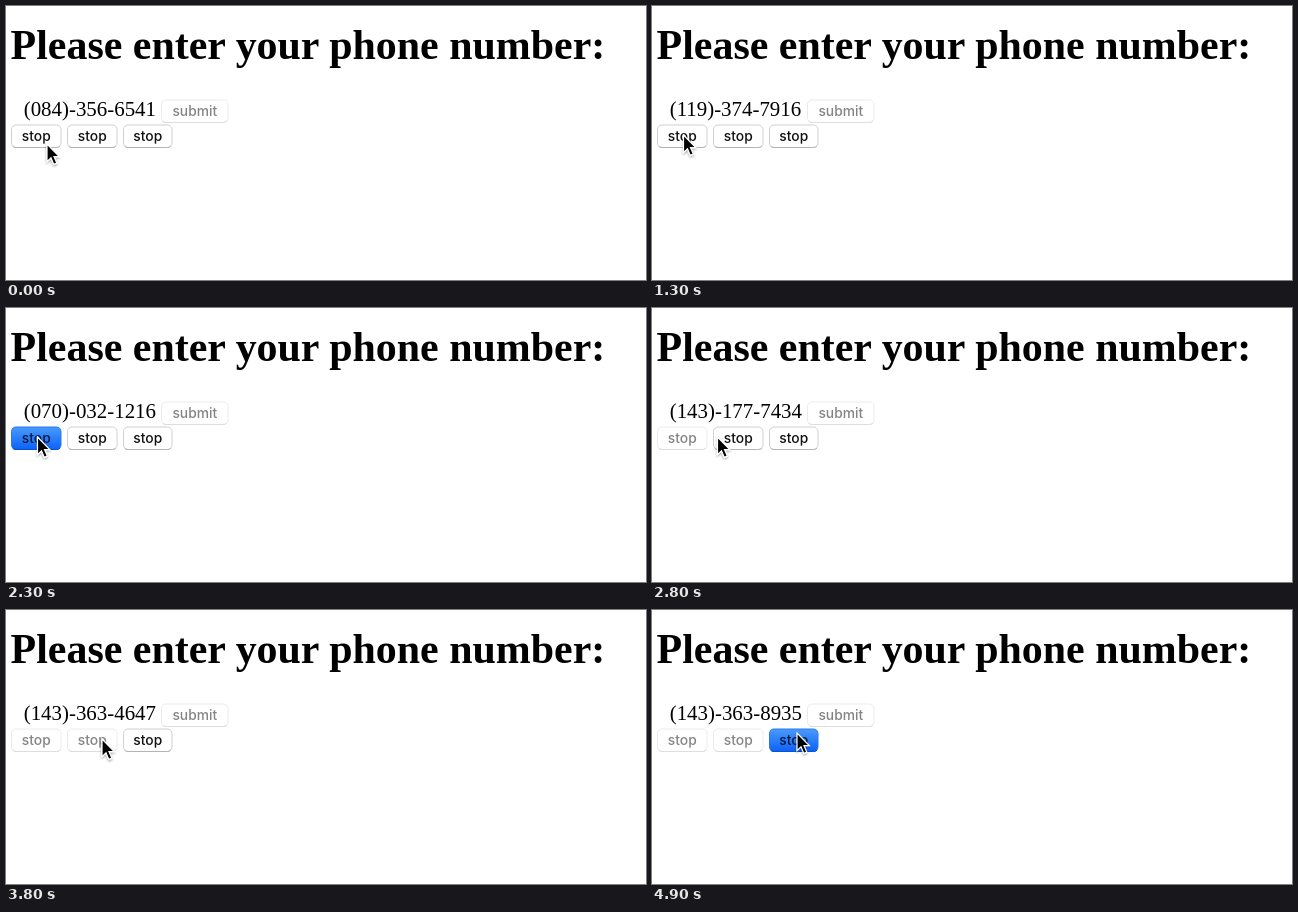
An HTML page that plays this animation: 640 px wide and 274 px high, repeating every 5 s.

```html
<!DOCTYPE html>
<html lang="en">
<head>
<meta charset="utf-8">
<title>Phone number</title>
<style>
  html, body { margin: 0; height: 100%; overflow: hidden; background: #fff; }
  svg { display: block; width: 100%; height: 100%; }
  .serif { font-family: "Liberation Serif", Times, serif; }
  .button text { font: 500 13.8px Inter, Arial, sans-serif; text-anchor: middle; fill: #111; }
  .button rect { fill: #fff; stroke: #d0d0d0; }
  .button .edge { fill: none; stroke: #b4b4b4; }
  .off text { fill: #848484; }
  .off rect { stroke: #ebebeb; }
  .off .edge { stroke: #dedede; }
  .down rect { fill: url(#blue); stroke: #2a78ee; }
  .down .edge { stroke: #0a50d0; }
  .down text { fill: #06193f; }
</style>
</head>
<body>
<svg id="stage" viewBox="0 0 640 274">
  <defs>
    <linearGradient id="blue" x2="0" y2="1">
      <stop stop-color="#4a9afc"/>
      <stop offset="1" stop-color="#0c62f8"/>
    </linearGradient>
    <filter id="shadow" x="-50%" y="-50%" width="200%" height="200%">
      <feDropShadow dx="0" dy="1.2" stdDeviation="1.1" flood-opacity=".4"/>
    </filter>
  </defs>
  <text class="serif" x="4.6" y="53" font-size="41.93" font-weight="bold">Please enter your phone number:</text>
  <text class="serif" id="phone" x="17.7" y="110" font-size="20.9"></text>
  <g id="buttons"></g>
  <path id="cursor" filter="url(#shadow)" stroke="#fff" stroke-width="1.2"
    d="M0 0V17.6L4 13.8L6.8 20.4L9.8 19.1L7 12.7H12.3Z"/>
</svg>
<script>
const LOOP = 5000, STEP = 100;
const $ = id => document.getElementById(id);

// Steps at which each stop button is pressed and released
const presses = [[22, 24], [36, 38], [49, 51]];

// Pointer keys: step, x, y
const path = [
  [0, 41, 138], [6, 31.5, 129], [25, 31.5, 129], [28, 65.5, 129], [33, 96, 129],
  [39, 96, 129], [42, 117, 129], [48, 145, 123], [50, 145, 123]
];

function addButton(label, x, y, w) {
  const h = 22.5;
  $('buttons').insertAdjacentHTML('beforeend', `<g class="button">
    <rect x="${x}" y="${y}" width="${w}" height="${h}" rx="4.5"/>
    <path class="edge" d="M${x + 1} ${y + h - 1.5}q1 1.5 3.5 1.5h${w - 9}q2.5 0 3.5 -1.5"/>
    <text x="${x + w / 2}" y="${y + 16.3}">${label}</text></g>`);
  return $('buttons').lastElementChild;
}

addButton('submit', 155.5, 94, 66.5).classList.add('off');
const stops = [5.5, 61.5, 117.5].map((x, i) => addButton('stop', x, 119, i < 2 ? 49.5 : 48.5));

function random(step, group) {
  const v = Math.sin(step * 12.9898 + group * 78.233 + 4) * 43758.5453;
  return v - Math.floor(v);
}

// Each group rolls until its button is released
function digits(step, group, limit, size) {
  const n = Math.floor(random(Math.min(step, presses[group][1]), group) * limit);
  return String(n).padStart(size, '0');
}

function pointer(step) {
  const i = path.findIndex(k => k[0] > step);
  const [a, x, y] = path[i - 1], [b, u, v] = path[i];
  const p = (step - a) / (b - a);
  return [x + (u - x) * p, y + (v - y) * p];
}

function draw() {
  const step = Math.floor(performance.now() % LOOP / STEP);
  $('phone').textContent =
    `(${digits(step, 0, 200, 3)})-${digits(step, 1, 1000, 3)}-${digits(step, 2, 10000, 4)}`;
  stops.forEach((button, i) => {
    const [down, up] = presses[i];
    button.classList.toggle('down', step >= down && step < up);
    button.classList.toggle('off', step >= up);
  });
  $('cursor').setAttribute('transform', `translate(${pointer(step)})`);
  requestAnimationFrame(draw);
}
draw();
</script>
</body>
</html>
```
